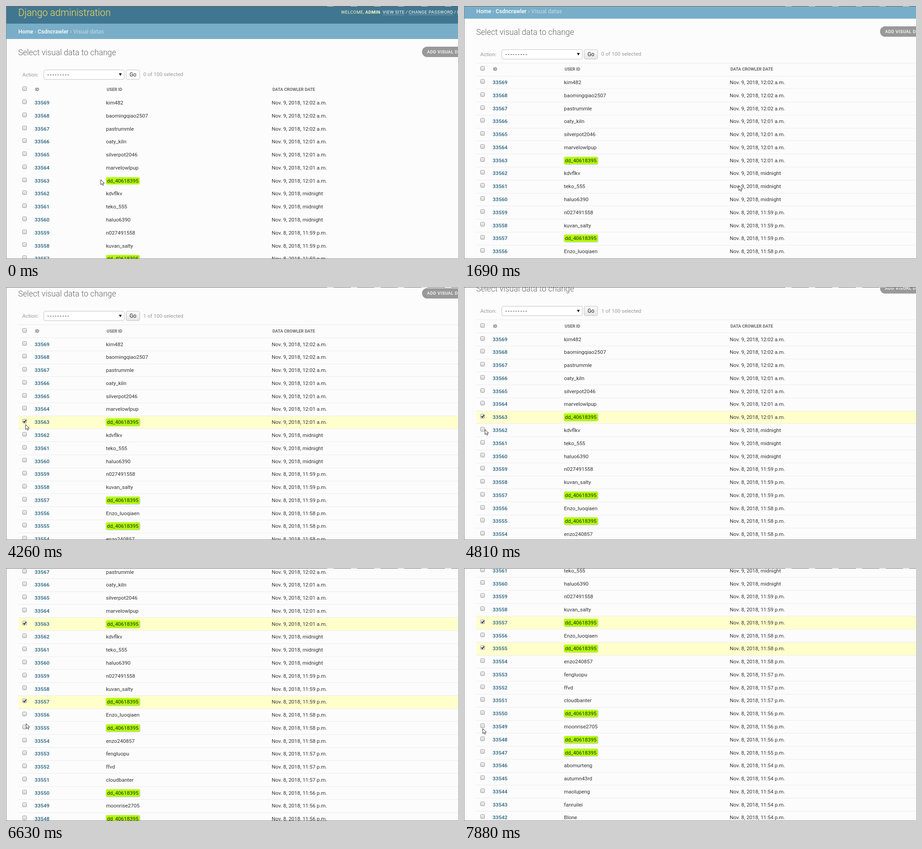
An HTML page with a canvas for the animation above (8000 ms loop, 999 by 560 pixels).

```html
<!DOCTYPE html>
<html lang="en">
<head>
<meta charset="utf-8">
<title>Django administration</title>
<style>
html, body { margin: 0; width: 100%; height: 100%; overflow: hidden; background: #fcfcfc; }
canvas { display: block; }
</style>
</head>
<body>
<canvas id="stage" width="999" height="560"></canvas>
<script>
const W = 999, H = 560, LOOP = 8000, FRAME = LOOP / 58;
const ctx = document.getElementById('stage').getContext('2d');

const ROW = 28.77, FIRST_ROW = 214, FIRST_ID = 33569;
const TAG = 'dd_40618395';
const users = ['kim482', 'baomingqiao2507', 'pastrummle', 'oaty_kiln', 'silverpot2046',
  'marvelowlpup', TAG, 'kdvflkv', 'teko_555', 'haluo6390', 'n027491558', 'kuvan_salty',
  TAG, 'Enzo_luoqiaen', TAG, 'enzo240857', 'fengluopu', 'ffvd', 'cloudbanter', TAG,
  'moonrise2705', TAG, TAG, 'abomurteng', 'autumn43rd', 'maolupeng', 'fanruilei', 'Blone'];

// One digit per minute, counting back from 12:02 a.m.: rows stamped in that minute
const dates = [...'343333315'].flatMap((rows, k) => Array(+rows).fill(stamp(2 - k)));

function stamp(minute) {
  if (minute < 0) return `Nov. 8, 2018, 11:${60 + minute} p.m.`;
  return 'Nov. 9, 2018, ' + (minute ? `12:0${minute} a.m.` : 'midnight');
}

// Row index -> time it gets ticked
const ticks = { 6: 3850, 12: 6060, 14: 6890 };

// Each wheel notch glides the page by the same distance
const NOTCH = 87.7, GLIDE = 260;
const wheel = [1523, 4770, 5100, 7480, 7600];

// Pointer stops: time, x, y
const stops = [[0, 209, 384], [414, 72, 400], [1379, 607, 397], [2000, 607, 397],
  [3034, 227, 447], [3770, 41, 294], [4828, 46, 315], [5655, 55, 300],
  [6060, 41, 296], [6760, 44, 350], [7448, 46, 371], [7862, 41, 355]];

function ease(u) {
  u = Math.min(1, Math.max(0, u));
  return u * u * (3 - 2 * u);
}

function scrollAt(t) {
  const turned = wheel.reduce((sum, at) => sum + ease((t - at) / GLIDE), 0);
  return Math.round(turned * NOTCH * 2) / 2;
}

function pointerAt(t) {
  const i = stops.findIndex(stop => stop[0] > t);
  if (i < 0) return stops[stops.length - 1].slice(1);
  const [t0, x0, y0] = stops[i - 1], [t1, x1, y1] = stops[i];
  const u = ease((t - t0) / (t1 - t0));
  return [x0 + (x1 - x0) * u, y0 + (y1 - y0) * u];
}

// y is the middle of the capitals
function text(str, x, y, size, color, weight = 400, spacing = 0) {
  ctx.font = `${weight} ${size}px Roboto, sans-serif`;
  ctx.letterSpacing = spacing + 'px';
  ctx.fillStyle = color;
  ctx.fillText(str, x, Math.round(y + size * 0.355));
}

function rect(x, y, w, h, color) {
  ctx.fillStyle = color;
  ctx.fillRect(x, y, w, h);
}

function box(x, y, w, h, r, fill, line) {
  ctx.beginPath();
  ctx.roundRect(x, y, w, h, r);
  ctx.fillStyle = fill;
  ctx.fill();
  if (line) {
    ctx.lineWidth = 1;
    ctx.strokeStyle = line;
    ctx.stroke();
  }
}

function shade(y, h, from, to) {
  const g = ctx.createLinearGradient(0, y, 0, y + h);
  g.addColorStop(0, from);
  g.addColorStop(1, to);
  return g;
}

function shape(points, dx, dy) {
  ctx.beginPath();
  points.forEach(([x, y]) => ctx.lineTo(x + dx, y + dy));
}

function checkbox(y, on) {
  const top = Math.round(y - 7) + 0.5;
  box(36.5, top, 9, 9, 2, shade(top, 9, '#f0f0f0', '#d6d6d6'), '#9c9c9c');
  if (!on) return;
  shape([[38.5, 4.5], [40.5, 7], [44.5, 1.8]], 0, top);
  ctx.lineWidth = 2;
  ctx.strokeStyle = '#333';
  ctx.stroke();
}

function tag(str, y, shadow) {
  ctx.save();
  if (shadow) {
    ctx.shadowColor = 'rgba(0, 0, 0, 0.4)';
    ctx.shadowBlur = 2;
    ctx.shadowOffsetX = ctx.shadowOffsetY = 0.5;
  }
  box(221, Math.round(y - 8), 74.5, 16, 3, '#b2ff00');
  ctx.restore();
  text(str, 223, y, 11.5, '#222');
}

function link(str, x, y, w) {
  text(str, x, y, 9.7, '#fff', 400, 0.44);
  ctx.globalAlpha = 0.35;
  rect(x, Math.round(y + 5), w, 1, '#fff');
  ctx.globalAlpha = 1;
}

function banner(s) {
  rect(0, -s, W, 40, '#417690');
  rect(0, 39 - s, W, 34, '#79aec8');
  text('Django administration', 27, 14 - s, 21.2, '#f5dd5d', 300);
  const y = 14 - s;
  text('WELCOME, ', 740.5, y, 9.7, '#ffc', 400, 0.44);
  text('ADMIN', 794, y, 9.7, '#ffc', 700, 0.44);
  text('.', 827, y, 9.7, '#ffc');
  link('VIEW SITE', 832.5, y, 48);
  text('/', 883.5, y, 9.7, '#ffc');
  link('CHANGE PASSWORD', 890, y, 98);
  text('/', 990.5, y, 9.7, '#ffc');
  link('LOG OUT', 997, y, 48);
  text('Home', 27.3, 57 - s, 12.2, '#fff', 500);
  text('›', 63, 57 - s, 12.4, '#c4dce8');
  text('Csdncrawler', 70, 57 - s, 12.2, '#fff', 500);
  text('›', 141.5, 57 - s, 12.4, '#c4dce8');
  text('Visual datas', 148.5, 57 - s, 12.4, '#c4dce8');
}

function toolbar(s, count, ruled) {
  text('Select visual data to change', 27, 102.5 - s, 17.7, '#666', 300);
  box(919.5, 90 - s, 120, 23, 11.5, '#999');
  text('ADD VISUAL DATA', 930.5, 101.5 - s, 9.7, '#fff', 500, 0.44);

  const y = 151.5 - s, top = Math.round(y - 11) + 0.5;
  text('Action:', 36, y, 11.5, '#999');
  box(83.5, top, 178, 21, 3.5, '#fff', '#c4c4c4');
  text('---------', 91.5, y, 12.4, '#222', 400, 2.1);
  shape([[249.5, -2.5], [256, -2.5], [252.75, 3]], 0, y);
  ctx.fillStyle = '#111';
  ctx.fill();
  box(265.5, top, 30, 21, 3.5, ruled ? shade(top, 21, '#fafafa', '#e6e6e6') : '#fefefe', '#c4c4c4');
  text('Go', 273, y, 12, '#222');
  text(`${count} of 100 selected`, 303.5, y - 0.5, 11.5, '#999');
}

function table(s, t, ruled) {
  const line = y => ruled && rect(27, Math.round(y - 14.4), W, 1, '#ececec');
  const head = 185 - s;
  line(head);
  checkbox(head, false);
  text('ID', 64.5, head, 9.4, '#666', 700);
  text('USER ID', 222.5, head, 9.4, '#666', 700);
  text('DATA CROWLER DATE', 589, head, 9.4, '#666', 700);

  users.forEach((user, i) => {
    const y = FIRST_ROW + i * ROW - s;
    if (y < -20 || y > H + 20) return;
    const on = t >= ticks[i];
    if (on) rect(28, Math.round(y - 14.4), W, 29, '#ffffcc');
    line(y);
    checkbox(y, on);
    text(FIRST_ID - i, 63.2, y, 11.5, '#417690', 700);
    if (user === TAG) tag(user, y, ruled);
    else text(user, 221, y, 11.5, '#333');
    text(dates[i], 587.3, y, 11.5, '#333');
  });
}

const arrow = [[0.5, 0.5], [0.5, 11.5], [3, 9.2], [4.8, 13], [6.7, 12.2], [5, 8.4], [8.4, 8.2]];

function pointer([x, y]) {
  shape(arrow, Math.round(x), Math.round(y));
  ctx.closePath();
  ctx.fillStyle = '#fff';
  ctx.fill();
  ctx.lineWidth = 1;
  ctx.strokeStyle = '#333';
  ctx.stroke();
}

function edges() {
  rect(0, 0, W, 1, '#666');
  for (let x = 710; x < W; x += 52) rect(x, 0, 14, 1, '#ccc');
  rect(0, 0, 1, H, '#888');
  rect(0, H - 1, W, 1, '#888');
}

function draw(now) {
  // The screen refreshes in fixed steps
  const t = Math.floor(((now + 20) % LOOP) / FRAME) * FRAME;
  const s = scrollAt(t);
  const ruled = t > wheel[0];
  const count = Object.values(ticks).filter(at => t >= at).length;
  rect(0, 0, W, H, '#fcfcfc');
  banner(s);
  toolbar(s, count, ruled);
  table(s, t, ruled);
  pointer(pointerAt(t));
  edges();
}

const begin = performance.now();
function loop() {
  draw(performance.now() - begin);
  requestAnimationFrame(loop);
}
loop();
</script>
</body>
</html>
```
